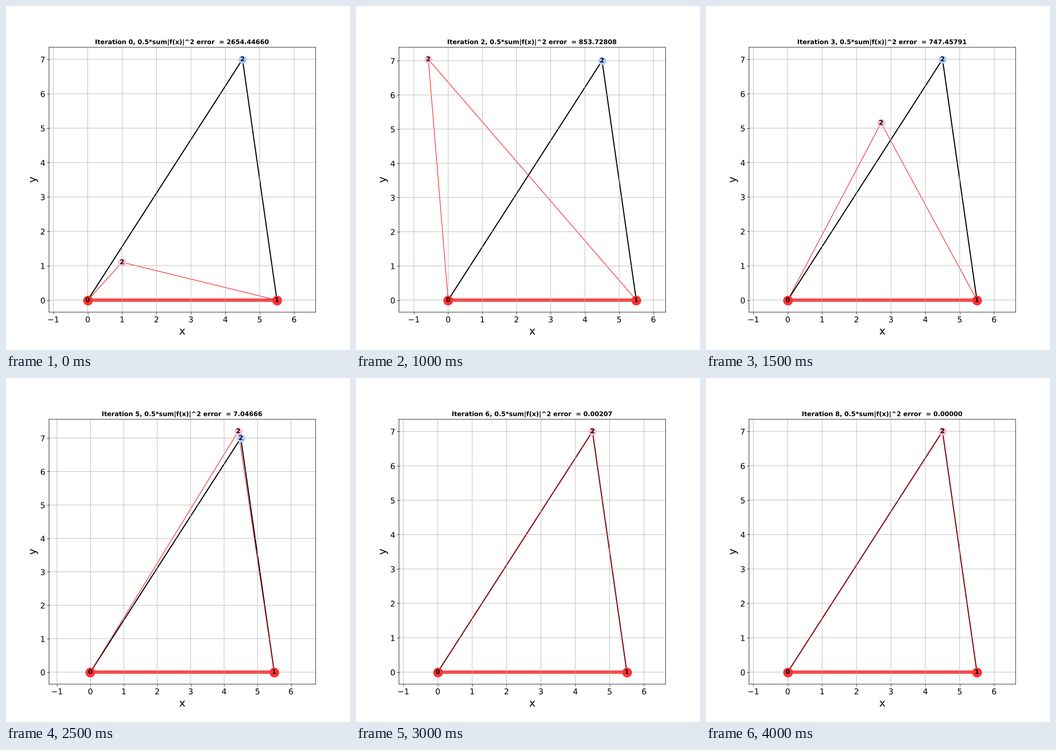
A matplotlib script for the animation above (4500 ms loop, 748 by 748 pixels).

```python
import numpy as np
import matplotlib.pyplot as plt
from matplotlib.animation import FuncAnimation
from matplotlib.patheffects import Normal
from matplotlib.ticker import MultipleLocator

SIZE = 748
STEPS = 9
ANCHORS = np.array([[0.0, 0.0], [5.5, 0.0]])
TARGET = np.array([4.5, 7.0])
START = np.array([1.0, 1.1])
RED, BLUE, PINK = "#ff3333", "#aaccff", "#ffbbd3"

# Smooth sub-pixel placement of lines, markers and glyphs.
plt.rcParams["path.snap"] = False
plt.rcParams["path.effects"] = [Normal()]

dist2 = ((TARGET - ANCHORS) ** 2).sum(axis=1)


def residual(p):
    return ((p - ANCHORS) ** 2).sum(axis=1) - dist2


def cost(p):
    return 0.5 * (residual(p) ** 2).sum()


def step(p):
    """Steepest descent with halving, then Gauss-Newton near the solution."""
    jac, res = 2 * (p - ANCHORS), residual(p)
    if cost(p) < 10:
        return p - np.linalg.solve(jac, res)
    grad, rate = jac.T @ res, 1.0
    while cost(p - rate * grad) >= cost(p):
        rate /= 2
    return p - rate * grad


path = [START]
while len(path) < STEPS:
    path.append(step(path[-1]))

fig = plt.figure(figsize=(9, 9), dpi=SIZE / 9, facecolor="white")
ax = fig.add_axes([0.125, 0.11, 0.775, 0.77])
ax.grid(True)
ax.set_xlabel("x", fontsize=20)
ax.set_ylabel("y", fontsize=20)
ax.tick_params(labelsize=15)
for axis in (ax.xaxis, ax.yaxis):
    axis.set_major_locator(MultipleLocator(1))
title = ax.set_title("", fontsize=12, fontweight="bold")


def edges(points, color, width):
    xs, ys = np.transpose(points)
    return ax.plot(xs, ys, color=color, lw=width, zorder=1)[0]


def node(p, color, size):
    return ax.scatter([p[0]], [p[1]], s=size, c=color, linewidths=1, zorder=2)


def label(p, text):
    return ax.text(p[0], p[1], text, fontsize=12, fontweight="bold",
                   ha="center", va="center", zorder=3)


def triangle(p):
    return np.array([ANCHORS[0], p, ANCHORS[1]])


edges(triangle(TARGET), "black", 2)
guess_edges = edges(triangle(START), "red", 1)
edges(ANCHORS, RED, 6).set_solid_capstyle("butt")
node(TARGET, BLUE, 200)
guess_node = node(START, PINK, 200)
for i, anchor in enumerate(ANCHORS):
    node(anchor, RED, 300)
    label(anchor, str(i))
label(TARGET, "2")
guess_label = label(START, "2")


def fit_view(p):
    """Equal scale on both axes, 5% margin in height, centred in width."""
    points = np.vstack([ANCHORS, TARGET, p])
    low, high = points.min(axis=0), points.max(axis=0)
    height = 1.1 * (high[1] - low[1])
    mid = (low + high) / 2
    half = np.array([height * 0.775 / 0.77, height]) / 2
    ax.set_xlim(mid[0] - half[0], mid[0] + half[0])
    ax.set_ylim(mid[1] - half[1], mid[1] + half[1])


def update(i):
    p = path[i]
    guess_edges.set_data(*triangle(p).T)
    guess_node.set_offsets([p])
    guess_label.set_position(p)
    title.set_text(f"Iteration {i}, 0.5*sum|f(x)|^2 error  = {cost(p):.5f}")
    fit_view(p)
    return guess_edges, guess_node, guess_label, title


anim = FuncAnimation(fig, update, frames=STEPS, init_func=lambda: update(0),
                     interval=500, repeat=True, repeat_delay=0, blit=False)
plt.show()
```
